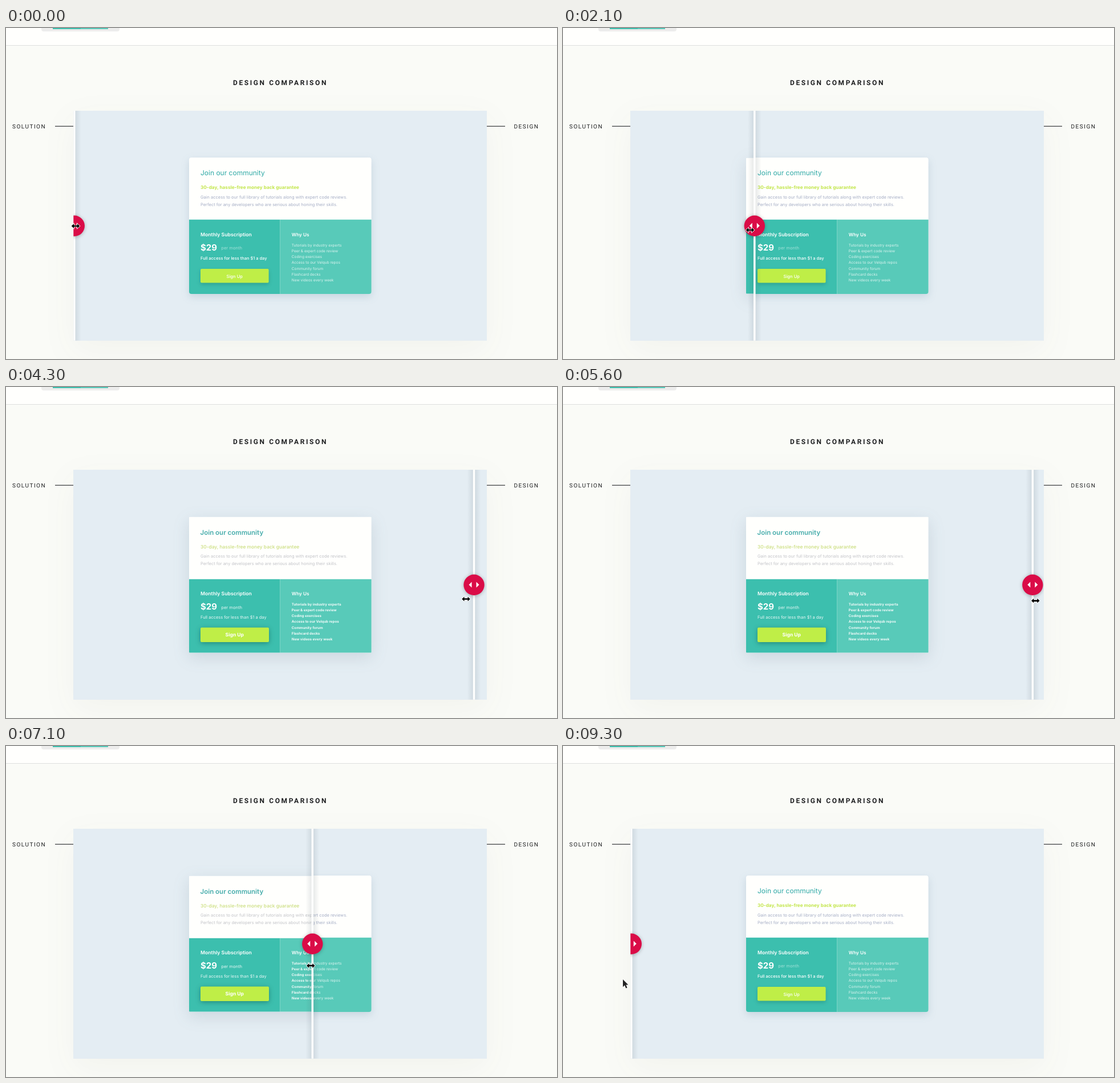
An HTML page that plays this animation: 966 by 580 pixels, repeating every 10000 ms.

```html
<!DOCTYPE html>
<html lang="en">
<head>
<meta charset="utf-8">
<title>Design comparison</title>
<style>
html, body { margin: 0; width: 100%; height: 100%; overflow: hidden; background: #fafbf7; }
svg { display: block; width: 966px; height: 580px; }
text { font-family: Inter, sans-serif; text-rendering: geometricPrecision; white-space: pre; }
.ui { font-family: Roboto, sans-serif; fill: #1d1e20; }
.stage-shadow { filter: drop-shadow(0 18px 28px rgba(70, 60, 40, .045)); }
.knob { filter: drop-shadow(0 1px 3px rgba(0, 0, 0, .28)); }
#design .card { filter: drop-shadow(0 5px 7px rgba(60, 100, 130, .17)); }
#design .button { filter: drop-shadow(0 3px 3px rgba(0, 60, 50, .22)); }
#solution .card { filter: drop-shadow(0 8px 14px rgba(60, 90, 110, .15)); }
#solution .button { filter: drop-shadow(0 2px 4px rgba(0, 50, 40, .38)); }
</style>
</head>
<body>
<svg viewBox="0 0 966 580">
  <defs>
    <clipPath id="stage"><rect x="118.3" y="145" width="724.5" height="402.7"/></clipPath>
    <clipPath id="split"><rect id="reveal" x="118" y="145" width="0" height="403"/></clipPath>
    <linearGradient id="shade">
      <stop offset="0" stop-color="#30424e" stop-opacity="0"/>
      <stop offset=".5" stop-color="#30424e" stop-opacity=".13"/>
      <stop offset="1" stop-color="#30424e" stop-opacity="0"/>
    </linearGradient>
  </defs>

  <rect width="966" height="580" fill="#fafbf7"/>
  <rect width="966" height="30" fill="#fffffd"/>
  <rect y="30" width="966" height="1" fill="#dfe0de"/>
  <rect x="62" y="-10" width="137" height="16" rx="4" fill="#ededec"/>
  <path d="M82 0h49v2h-49z" fill="#3cbfae"/>
  <path d="M131 0h48v2h-48z" fill="#57c9b9"/>

  <text class="ui" x="398" y="100.3" font-size="12" font-weight="700" letter-spacing="2.6">DESIGN COMPARISON</text>
  <text class="ui" x="11" y="175.8" font-size="10" letter-spacing="1.5">SOLUTION</text>
  <text class="ui" x="890.5" y="175.8" font-size="10" letter-spacing="1.5">DESIGN</text>
  <path d="M86 172.3h33M842 172.3h33" stroke="#5d5e60" stroke-width="1.4"/>

  <rect class="stage-shadow" x="118.3" y="145" width="724.5" height="402.7" fill="#e4edf3"/>
  <g clip-path="url(#stage)">
    <g id="design"></g>
    <g clip-path="url(#split)"><g id="solution"></g></g>
    <g id="slider">
      <rect x="-12" y="145" width="24" height="403" fill="url(#shade)"/>
      <rect x="-1.75" y="145" width="3.5" height="403" fill="#fffffe"/>
      <circle class="knob" cy="346.8" r="18.2" fill="#da0c47"/>
      <path d="M-4 341.5v10l-5-5zM4 341.5v10l5-5z" fill="#fff"/>
    </g>
  </g>

  <g id="resize">
    <path d="M-7.3 0L-3-4V-1.3H3V-4L7.3 0L3 4V1.3H-3V4Z" fill="#000" stroke="#fff" stroke-width="1.6" paint-order="stroke"/>
  </g>
  <path id="arrow" transform="translate(105 409)" d="M0 0V13.2L3.1 10.3L5.3 15.4L7.6 14.4L5.4 9.4H9.4Z" fill="#222" stroke="#fff" stroke-width="1" paint-order="stroke"/>
</svg>
<script>
const $ = id => document.getElementById(id);

const perks = ['Tutorials by industry experts', 'Peer &amp; expert code review', 'Coding exercises',
  'Access to our Velqub repos', 'Community forum', 'Flashcard decks', 'New videos every week'];

const text = (x, y, size, weight, fill, str, extra = '') =>
  `<text x="${x}" y="${y}" font-size="${size}" font-weight="${weight}" fill="${fill}" ${extra}>${str}</text>`;

function card(o) {
  const { top, bottom, mid, r } = o, h = bottom - top;
  const [sub, price] = [o.sub, '#fff'];
  return `<rect x="118" y="145" width="725" height="403" fill="#e4edf3"/>
    <rect class="card" x="321" y="${top}" width="319.6" height="${h}" rx="${r}" fill="#fffffd"/>
    <path d="M321 ${mid}H480.5V${bottom}H${321 + r}Q321 ${bottom} 321 ${bottom - r}Z" fill="#3cbfae"/>
    <path d="M480.5 ${mid}H640.6V${bottom - r}Q640.6 ${bottom} ${640.6 - r} ${bottom}H480.5Z" fill="#58cab9"/>
    <rect class="button" x="341" y="${o.btn[0]}" width="${o.btn[1]}" height="${o.btn[2]}" rx="2" fill="#bfee47"/>`
    + text(o.title[0], o.title[1], o.title[2], o.title[3], o.title[4], 'Join our community')
    + text(341, sub[0], sub[1], sub[2], sub[3], '30-day, hassle-free money back guarantee')
    + text(341, 298.7, 7.47, 400, o.body, 'Gain access to our full library of tutorials along with expert code reviews.')
    + text(341, 311.7, 7.47, 400, o.body, 'Perfect for any developers who are serious about honing their skills.')
    + text(341, o.head, 8.68, 600, price, 'Monthly Subscription')
    + text(341, 390.4, 15, 700, price, '$29')
    + text(377.3, o.per[0], 7.6, 400, price, 'per month', `opacity="${o.per[1]}"`)
    + text(341, 405.6, 7.45, o.full[0], price, 'Full access for less than $1 a day', `opacity="${o.full[1]}"`)
    + text(400.8, o.sign[0], o.sign[1], o.sign[2], price, 'Sign Up', 'text-anchor="middle"')
    + text(500.8, o.head, 8.2, 600, price, 'Why Us')
    + perks.map((p, i) => text(500.8, 383.3 + i * 10.05, o.list[0], o.list[1], price, p, `opacity="${o.list[2]}"`)).join('');
}

$('design').innerHTML = card({
  top: 227, bottom: 466, mid: 335.7, r: 4, btn: [422, 119.6, 24.6],
  title: [341, 258.4, 12, 400, '#2fa9a6'], sub: [282.2, 8.2, 700, '#c3e64c'], body: '#a6aec6',
  head: 364.8, per: [387.8, .5], full: [500, 1], sign: [437.8, 7.65, 500], list: [6.54, 400, .78]
});
$('solution').innerHTML = card({
  top: 227.8, bottom: 465.6, mid: 336.8, r: 1, btn: [421.6, 120, 25.4],
  title: [340.5, 259, 11.5, 600, '#45acab'], sub: [283, 8.4, 500, '#cadd7c'], body: '#c3c4c9',
  head: 365.2, per: [388.6, .85], full: [400, .88], sign: [437.2, 8.6, 700], list: [6.2, 700, .92]
});

// time, slider x, pointer x, pointer y
const keys = [
  [0, 119.75, 122, 347], [300, 119.75, 122, 347], [400, 120.7, 122, 347], [600, 120.7, 122, 347],
  [1000, 160, 162, 348], [1700, 292, 294, 351], [1900, 335, 334, 353], [2100, 335.8, 328, 354],
  [2200, 336, 344, 355], [2500, 480, 490, 362], [2800, 617, 612, 369], [3100, 537, 532, 371.5],
  [3300, 488, 490, 371.5], [3600, 600, 610, 371.5], [3900, 726, 734, 371.5], [4200, 827, 825, 371.5],
  [4300, 820.5, 806.5, 371.5], [4400, 808, 808, 371.5], [4700, 841, 865, 373], [5300, 841, 865, 373],
  [5500, 840, 846, 374], [6400, 690, 687, 379.5], [7500, 450, 447, 388], [7800, 388.2, 388, 391],
  [8600, 156, 153, 404], [8900, 122, 107, 409], [9000, 119.75, 105, 409.5], [10000, 119.75, 105, 409.5]
];

function pose(t) {
  const i = keys.findIndex(k => k[0] > t), a = keys[i - 1], b = keys[i];
  const u = (t - a[0]) / (b[0] - a[0]);
  return a.map((v, n) => v + (b[n] - v) * u);
}

function draw() {
  const t = Math.floor(performance.now() % 10000 / 100) * 100;
  const [, x, px, py] = pose(t);
  const away = t >= 9300;
  $('reveal').setAttribute('width', x - 118);
  $('slider').setAttribute('transform', `translate(${x} 0)`);
  $('resize').setAttribute('transform', `translate(${px} ${py})`);
  $('resize').style.display = away ? 'none' : '';
  $('arrow').style.display = away ? '' : 'none';
  requestAnimationFrame(draw);
}
draw();
</script>
</body>
</html>
```
